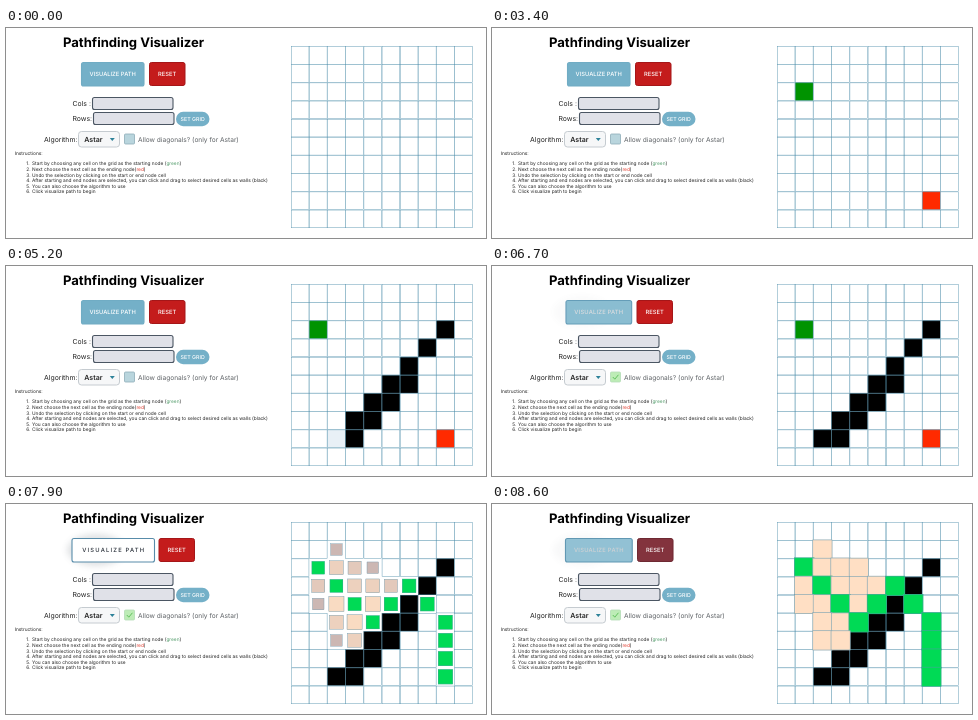
An HTML page with a canvas that plays this animation: 480 by 210 pixels, repeating every 8700 ms.

```html
<!DOCTYPE html>
<html lang="en">
<head>
<meta charset="utf-8">
<title>Pathfinding Visualizer</title>
<style>
html, body { margin: 0; width: 100%; height: 100%; overflow: hidden; background: #fff; }
canvas, svg { position: absolute; left: 0; top: 0; width: 480px; height: 210px; }
text { font-family: Inter, "Open Sans", sans-serif; fill: #222; white-space: pre; text-rendering: geometricPrecision; }
.label { font-size: 6.9px; }
.small { font-size: 4.82px; }
.mid { text-anchor: middle; }
.button { font-size: 5.8px; font-weight: 500; fill: #fff; }
.field { fill: #e0e1e8; stroke: #4b5663; stroke-width: 1.1; }
#shade { filter: blur(3px); }
</style>
</head>
<body>
<canvas id="grid" width="480" height="210"></canvas>
<svg viewBox="0 0 480 210">
  <text x="127.5" y="19.3" class="mid" font-size="13.1" font-weight="700" style="fill:#000">Pathfinding Visualizer</text>

  <ellipse id="shade" cx="90" cy="46" rx="29" ry="16" fill="#56616b"/>
  <rect id="visualize" y="34.5" height="23.5" rx="2" stroke-width="1.1"/>
  <text id="visualizeText" y="48.2" class="mid button">VISUALIZE PATH</text>
  <rect id="reset" y="34.5" width="35.5" height="23" rx="2" stroke-width="1"/>
  <text id="resetText" y="48.2" class="mid button">RESET</text>

  <text x="66.5" y="78" class="label">Cols :</text>
  <rect x="86.5" y="69.5" width="80.5" height="12" rx="2" class="field"/>
  <text x="66.5" y="93" class="label">Rows:</text>
  <rect x="87.5" y="84.5" width="80.5" height="12" rx="2" class="field"/>
  <rect x="170" y="83.8" width="33.5" height="14.4" rx="7.2" fill="#74b0c8"/>
  <text x="186.7" y="93" class="mid button" style="font-size:5.3px">SET GRID</text>

  <text x="38" y="114" class="label">Algorithm:</text>
  <rect x="72.5" y="103.5" width="41" height="15.5" rx="3" fill="#f6f7f8" stroke="#c5cbd0"/>
  <text x="78.3" y="113.9" font-size="7" font-weight="600">Astar</text>
  <path d="M103.8 110h5l-2.5 3z" fill="#2e8299"/>
  <rect id="box" x="118.5" y="106" width="10" height="10" rx="1" stroke-width=".8"/>
  <path id="tick" d="M120.8 111l2 2.2 3.6-4.4" fill="none" stroke="#62c25e" stroke-width="1"/>
  <text x="132" y="113.9" font-size="6.6" style="fill:#5c6064">Allow diagonals? (only for Astar)</text>

  <text x="8.7" y="126.8" class="small">Instructions:</text>
  <g id="steps"></g>
</svg>
<script>
const LOOP = 8700, X0 = 285, Y0 = 18.3, SIZE = 18.17;
const $ = id => document.getElementById(id);
const ctx = $('grid').getContext('2d');

$('steps').innerHTML = [
  'Start by choosing any cell on the grid as the starting node (<tspan fill="#4f9a68">green</tspan>)',
  'Next choose the next cell as the ending node(<tspan fill="#e0392b">red</tspan>)',
  'Undo the selection by clicking on the start or end node cell',
  'After starting and end nodes are selected, you can click and drag to select desired cells as walls (black)',
  'You can also choose the algorithm to use',
  'Click visualize path to begin'
].map((s, i) => `<text x="20.3" y="${137.2 + i * 5.65}" class="small">${i + 1}.</text>
  <text x="26" y="${137.2 + i * 5.65}" class="small">${s}</text>`).join('');

// Cells are written as two digits: column, row.
const list = s => s.split(' ');
const START = '12', END = '88';
const path = list('12 23 34 45 54 63 74 85 86 87 88');
const walls = list('82 73 64 65 55 56 46 47 37 38 28');

// Pointer position over the grid, from each time on
const pointer = [[1100, START], [2300, ''], [2400, END], [3400, ''], [3700, '82'], [4200, '55'],
  [4300, '56'], [4400, '46'], [4500, '47'], [4600, '37'], [4700, '38'], [4800, '28'], [5400, '']];

const wallAt = {}, visitAt = {}, pathAt = {};
walls.forEach((c, i) => wallAt[c] = i < 1 ? 3700 : i < 5 ? 4200 : 3800 + i * 100);
path.forEach((c, i) => pathAt[c] = 7830 - i * 7);
for (const [at, cells] of [[7240, '12 23 34'], [7340, '24 44 35 45'], [7380, '54'], [7430, '22 33 43 25 36'],
  [7480, '32 53 13'], [7530, '63'], [7580, '14 21 42 26 74'], [7620, '85 86 87']])
  for (const c of list(cells)) visitAt[c] = at;

const clamp = v => Math.max(0, Math.min(1, v));
const smooth = (t, a, b) => { const v = clamp((t - a) / (b - a)); return v * v * (3 - 2 * v); };
const easeOut = v => 1 - (1 - clamp(v)) ** 1.7;
const mix = (a, b, p) => `rgb(${a.map((v, i) => Math.round(v + (b[i] - v) * p))})`;

function drawCell(c, fill, scale = 1) {
  const s = SIZE * scale, w = 0.45 * scale;
  const x = X0 + (+c[0] + 0.5) * SIZE - s / 2, y = Y0 + (+c[1] + 0.5) * SIZE - s / 2;
  ctx.fillStyle = fill;
  ctx.fillRect(x, y, s, s);
  ctx.strokeStyle = '#5592ae';
  ctx.lineWidth = w;
  ctx.strokeRect(x + w / 2, y + w / 2, s - w, s - w);
}

function visitCell(c, age) {
  const scale = age < 1125 ? 0.3 + 0.8 * easeOut(age / 1125) : 1.1 - 0.1 * easeOut((age - 1125) / 375);
  drawCell(c, mix([92, 96, 142], [255, 223, 196], easeOut(age / 650)), scale);
}

function pathCell(c, age) {
  const scale = age < 600 ? 0.6 + 0.6 * easeOut(age / 600) : 1.2 - 0.2 * easeOut((age - 600) / 600);
  drawCell(c, '#00da55', scale);
}

function drawGrid(t) {
  ctx.clearRect(0, 0, 480, 210);
  const hover = (pointer.filter(p => p[0] <= t).pop() || [0, ''])[1];
  const moving = [];
  for (let r = 0; r < 10; r++) for (let k = 0; k < 10; k++) {
    const c = `${k}${r}`;
    if (t >= pathAt[c] || t >= visitAt[c]) moving.push(c);
    else drawCell(c, c === hover ? '#e8f0f6'
      : c === START && t >= 2300 ? '#009300'
      : c === END && t >= 3400 ? '#ff2a00'
      : t >= wallAt[c] ? '#000' : '#fff');
  }
  for (const c of moving)
    t >= pathAt[c] ? pathCell(c, t - pathAt[c]) : visitCell(c, t - visitAt[c]);
}

function set(id, attrs) {
  for (const k in attrs) $(id).setAttribute(k, attrs[k]);
}

function drawControls(t) {
  const p = smooth(t, 6600, 7000) - smooth(t, 8250, 8750);
  const dim = smooth(t, 8350, 8750);
  set('shade', { opacity: 0.18 * p });
  set('visualize', { x: 75.5 - 9.5 * p, width: 62.5 + 20 * p,
    fill: mix([116, 176, 200], [255, 255, 255], p), stroke: mix([112, 172, 196], [88, 140, 170], Math.min(1, p * 3)) });
  set('visualizeText', { x: 106.7 + 1.1 * p, 'letter-spacing': 1.2 * p });
  $('visualizeText').style.fill = mix([255, 255, 255], [35, 42, 52], p);
  set('reset', { x: 143.5 + 9.5 * p, fill: mix([196, 28, 28], [102, 62, 76], dim), stroke: mix([165, 22, 24], [85, 50, 62], dim) });
  set('resetText', { x: 161.2 + 9.5 * p });
  const checked = t >= 6200;
  set('box', { fill: checked ? '#bdecb6' : '#b9d5dd', stroke: checked ? '#b4dcb6' : '#8fadb8' });
  set('tick', { visibility: checked ? 'visible' : 'hidden' });
}

function frame() {
  const t = performance.now() % LOOP;
  drawGrid(t);
  drawControls(t);
  requestAnimationFrame(frame);
}
frame();
</script>
</body>
</html>
```
